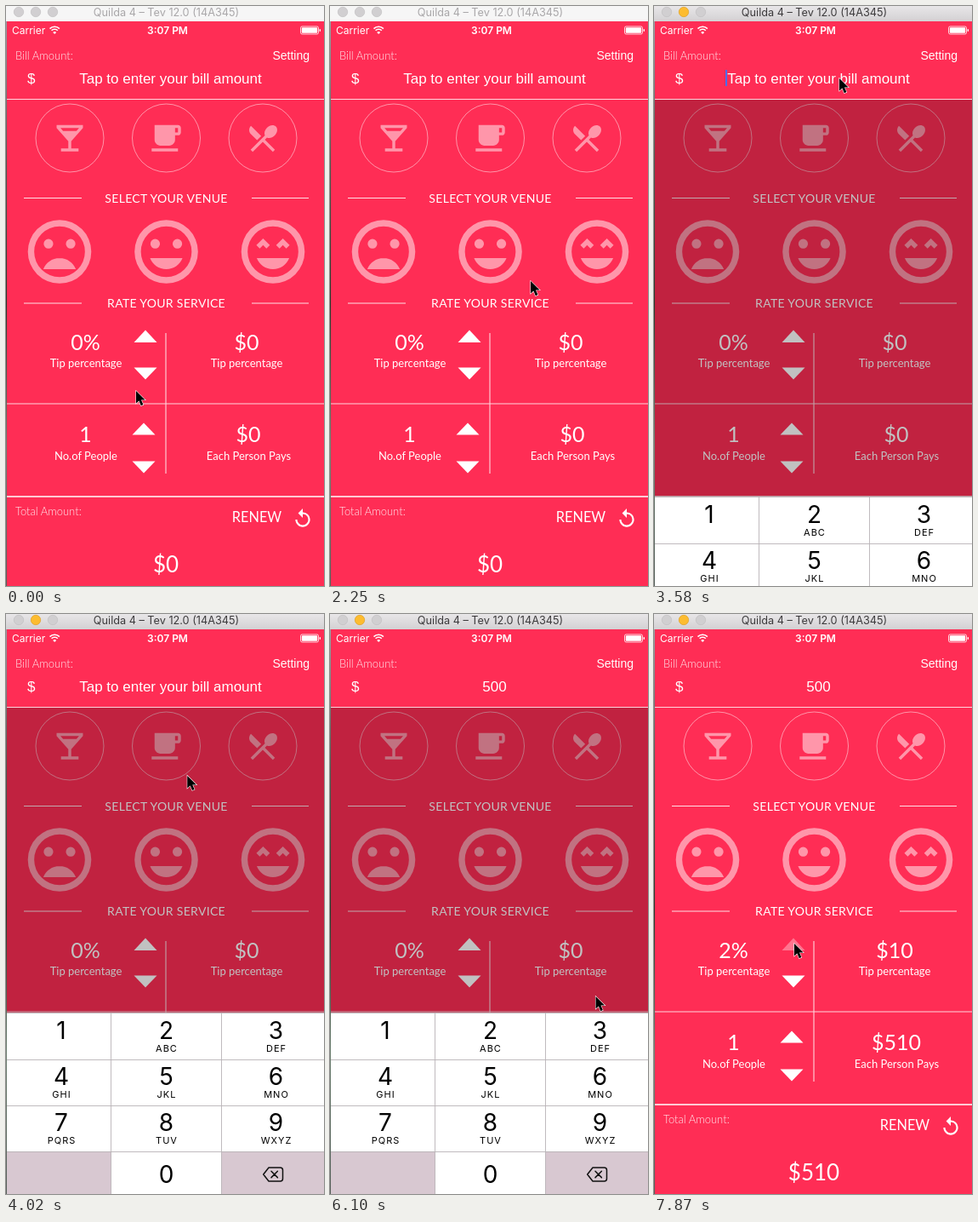
Write an HTML page that moves like this. It is 374x681 px and loops after 8 s.

```html
<!DOCTYPE html>
<html lang="en">
<head>
<meta charset="utf-8">
<title>Tip calculator</title>
<style>
html, body { margin: 0; width: 100%; height: 100%; overflow: hidden; background: #ff2d55; }
svg { display: block; width: 100%; height: 100%; }
text { fill: #fff; white-space: pre; }
.mid { text-anchor: middle; }
.ui { font-family: Inter, Roboto, sans-serif; }
.field { font-family: "Liberation Sans", Arial, sans-serif; }
.label { font-family: Lato, "Open Sans", sans-serif; font-size: 13px; }
.soft { font-weight: 300; }
.head { font-size: 14px; letter-spacing: .3px; }
.num { font-size: 25px; }
.total { font-size: 26px; }
.key { fill: #000; font-size: 28px; }
.abc { fill: #000; font-size: 11px; letter-spacing: 1px; }
.line { stroke: #fff; fill: none; }
.icon { fill: #fff; fill-opacity: .5; }
</style>
</head>
<body>
<svg id="stage" viewBox="0 0 374 681" preserveAspectRatio="none"></svg>
<script>
const text = (x, y, cls, s, more = '') => `<text x="${x}" y="${y}" class="${cls}" ${more}>${s}</text>`;
const path = (d, more = '') => `<path d="${d}" ${more}/>`;
const rect = (x, y, w, h, fill, more = '') =>
  `<rect x="${x}" y="${y}" width="${w}" height="${h}" fill="${fill}" ${more}/>`;
const glyph = (x, y, k, body, cls = 'icon') =>
  `<g class="${cls}" transform="translate(${x} ${y}) scale(${k}) translate(-12 -12)">${body}</g>`;

const GLASS = 'M21 5V3H3v2l8 9v5H6v2h12v-2h-5v-5l8-9zM7.43 7L5.66 5h12.69l-1.78 2H7.43z';
const CUP = 'M20 3H4v10c0 2.21 1.79 4 4 4h6c2.21 0 4-1.79 4-4v-3h2c1.11 0 2-.9 2-2V5c0-1.11-.89-2-2-2zm0 5h-2V5h2v3zM2 21h18v-2H2v2z';
const CUTLERY = 'M8.1 13.34l2.83-2.83L3.91 3.5c-1.56 1.56-1.56 4.09 0 5.66l4.19 4.18zm6.78-1.81c1.53.71 3.68.21 5.27-1.38 1.91-1.91 2.28-4.65.81-6.12-1.46-1.46-4.2-1.1-6.12.81-1.59 1.59-2.09 3.74-1.38 5.27L3.7 19.87l1.41 1.41L12 14.41l6.88 6.88 1.41-1.41L13.41 13l1.47-1.47z';
const REPLAY = 'M12 5V1L7 6l5 5V7c3.31 0 6 2.69 6 6s-2.69 6-6 6-6-2.69-6-6H4c0 4.42 3.58 8 8 8s8-3.58 8-8-3.58-8-8-8z';
const DOTS = 'M7 9.5a1.5 1.5 0 1 0 3 0a1.5 1.5 0 1 0-3 0zM14 9.5a1.5 1.5 0 1 0 3 0a1.5 1.5 0 1 0-3 0z';
const CARETS = 'M8.88 7.82L11 9.94 9.94 11 8.88 9.94 7.82 11 6.76 9.94zM13 9.94L14.06 11l1.06-1.06L16.18 11l1.06-1.06-2.12-2.12z';
const FROWN = 'M12 14c-2.33 0-4.32 1.45-5.12 3.5h10.24c-.8-2.05-2.79-3.5-5.12-3.5z';
const SMILE = 'M12 17.5c2.33 0 4.31-1.46 5.11-3.5H6.89c.8 2.04 2.78 3.5 5.11 3.5z';
const RING = 'M12 2a10 10 0 1 0 0 20a10 10 0 1 0 0-20zM12 4a8 8 0 1 1 0 16a8 8 0 1 1 0-16z';

const venue = (x, d) =>
  `<circle cx="${x}" cy="155" r="40" class="line" stroke-opacity=".55" stroke-width=".9"/>` +
  glyph(x, 155.3, 1.72, path(d));
const face = (x, eyes, mouth) => glyph(x, 288.5, 3.73, path(RING + eyes + mouth, 'fill-rule="evenodd"'));
const arrow = (x, y, h, id = '') => path(`M${x - 13.5} ${y}h27l-13.5 ${h}z`, `fill="#fff" ${id}`);
const heading = (y, s) =>
  path(`M21 ${y}H89M289 ${y}H356`, 'class="line" stroke-opacity=".85"') + text(188.5, y + 5, 'label mid head', s);

function windowBar() {
  return `<linearGradient id="bar" x2="0" y2="1"><stop stop-color="#e8e6e8"/><stop offset="1" stop-color="#d3d1d3"/></linearGradient>
    <linearGradient id="edge" x2="0" y2="1"><stop stop-color="#9a9fa2"/><stop offset=".25" stop-color="#4b5a50"/>
    <stop offset=".5" stop-color="#25382a"/><stop offset=".75" stop-color="#6f8273"/><stop offset="1" stop-color="#56605a"/></linearGradient>` +
    rect(0, 0, 374, 18, '#f6f6f6', 'id="top"') + rect(0, 18, 1, 663, 'url(#edge)') +
    [15, 35, 55].map((x, i) =>
      `<circle id="light${i}" cx="${x}" cy="7" r="5.7" fill="#d1cfd1" stroke="#c2c0c2" stroke-width=".7"/>`).join('') +
    text(188.5, 12, 'ui mid', 'Quilda 4 – Tev 12.0 (14A345)', 'id="title" font-size="12.7"');
}

function statusBar() {
  return text(7, 32.5, 'ui', 'Carrier', 'font-size="12"') +
    path('M51.5 26.6a8 8 0 0 1 11.4 0M53.6 28.8a5 5 0 0 1 7.2 0', 'class="line" stroke-width="1.6"') +
    path('M57.2 33l-2-2.1a2.8 2.8 0 0 1 4 0z', 'fill="#fff"') +
    text(190, 32.5, 'ui mid', '3:07 PM', 'font-size="12" font-weight="600"') +
    rect(346.5, 24, 21, 9, 'none', 'rx="1.8" stroke="#fff" stroke-width=".8"') +
    rect(347.8, 25.3, 18.4, 6.4, '#fff', 'rx=".8"') + rect(368.6, 27, 1.4, 3, '#fff', 'rx=".7"');
}

function appBody() {
  return text(11, 62.5, 'label soft', 'Bill Amount:', 'fill-opacity=".9"') +
    text(357, 63, 'field', 'Setting', 'font-size="14" text-anchor="end"') +
    text(25, 91, 'field', '$', 'font-size="17"') +
    text(193.5, 91, 'field mid', '', 'id="bill" font-size="17"') +
    rect(84, 75, 2, 19, '#4a6cf0', 'id="caret"') +
    path('M1 109.5H374', 'class="line" stroke-opacity=".8"') +
    venue(75, GLASS) + venue(188.5, CUP) + venue(302, CUTLERY) +
    heading(225.5, 'SELECT YOUR VENUE') +
    face(63, DOTS, FROWN) + face(188.5, DOTS, SMILE) + face(314, CARETS, SMILE) +
    heading(349, 'RATE YOUR SERVICE') +
    path('M188 384V549M1 467H374', 'class="line" stroke-opacity=".8" stroke-width="1.1"') +
    path('M1 576H374', 'class="line" stroke-width="1.6"') +
    text(93.5, 403.5, 'label mid num', '', 'id="rate"') + text(94, 424, 'label mid', 'Tip percentage') +
    text(283, 403.5, 'label mid num', '', 'id="tip"') + text(283, 424, 'label mid', 'Tip percentage') +
    text(93.5, 512, 'label mid num', '1') + text(94, 533, 'label mid', 'No.of People') +
    text(285, 512, 'label mid num', '', 'id="each"') + text(285.5, 533, 'label mid', 'Each Person Pays') +
    arrow(164, 395, -14.5, 'id="up"') + arrow(164, 424.5, 14) + arrow(162, 503.5, -14) + arrow(162, 534.5, 14) +
    text(11, 597.5, 'label soft', 'Total Amount:', 'fill-opacity=".9"') +
    text(295, 606, 'label mid', 'RENEW', 'style="font-size:16.3px"') +
    glyph(349, 602, 1.08, path(REPLAY), '" fill="#fff') +
    text(188, 665, 'label mid total', '', 'id="total"') +
    rect(1, 110, 373, 571, '#000', 'id="dim" fill-opacity=".245"');
}

// Drawn with its top edge at y = 0.
function keypad() {
  const letters = ['', 'ABC', 'DEF', 'GHI', 'JKL', 'MNO', 'PQRS', 'TUV', 'WXYZ'];
  const cx = [65, 188.5, 317.5];
  const keys = letters.map((s, i) => {
    const x = cx[i % 3], y = 54 * Math.floor(i / 3);
    return text(x, y + 31, 'ui mid key', i + 1) + text(x + .5, y + 46, 'ui mid abc', s);
  }).join('');
  return rect(1, 0, 373, 216, '#fff') + rect(1, 163, 122.5, 53, '#d8c8d1') + rect(253.5, 163, 121, 53, '#d8c8d1') +
    rect(124, 55.5, 129.5, 54, '#d8c8d1', 'id="key5"') + rect(124, 163.5, 129.5, 54, '#d8c8d1', 'id="key0"') +
    path('M1 .5H374M1 55.5H374M1 109.5H374M1 163.5H374M123.5 0V216M253.5 0V216', 'stroke="#b9b4b7" fill="none" stroke-width=".9"') +
    keys + text(188.5, 200, 'ui mid key', '0') +
    path('M309 182H322.5a3 3 0 0 1 3 3v10a3 3 0 0 1-3 3H309l-6.3-8zM312 186.2l7.4 7.4M319.4 186.2l-7.4 7.4',
      'fill="none" stroke="#111" stroke-width="1.5" stroke-linejoin="round" stroke-linecap="round"');
}

const stage = document.getElementById('stage');
stage.innerHTML = rect(0, 0, 374, 681, '#ff2d55') + windowBar() + statusBar() + appBody() +
  `<g id="pad">${keypad()}</g>` +
  path('M0 0V14.6L3.4 11.5 5.8 17.2 8.4 16.1 6 10.5H10.6Z', 'id="mouse" stroke="#fff" stroke-width="1.1" paint-order="stroke"');
const el = {};
stage.querySelectorAll('[id]').forEach(n => el[n.id] = n);

const LOOP = 8000;
// Screen updates come in bursts: first time, last time, number of updates.
const BURSTS = [[150, 600, 4], [2250, 3290, 8], [3440, 4470, 8], [4620, 5200, 5], [5500, 6100, 5], [6540, 6540, 1], [6990, 7870, 7]];
// Pointer way points: time, x, y.
const WAY = [
  [0, 153, 452], [150, 153, 450], [450, 174, 483],
  [2250, 236, 323], [2550, 308, 490], [2700, 323, 527], [3000, 262, 220], [3290, 218, 85],
  [3900, 218, 85], [4470, 197, 550], [4620, 198, 555], [4770, 203, 609], [5050, 198, 657], [5200, 197, 660],
  [5650, 197, 660], [6090, 312.5, 449], [6840, 312.5, 449], [7280, 172, 392], [7430, 165, 387], [LOOP, 165, 387]
];
const TYPED = [[4600, '5'], [5500, '50'], [5640, '500']];

const between = (t, a, b) => t >= a && t < b;
const smooth = p => { p = Math.min(1, Math.max(0, p)); return p * p * (3 - 2 * p); };
const show = (node, on) => node.setAttribute('visibility', on ? 'visible' : 'hidden');

function snap(t) {
  let q = 0;
  for (const [a, b, n] of BURSTS) {
    if (t < a) break;
    const d = (b - a) / (n - 1) || 1;
    q = a + Math.min(n - 1, Math.floor((t - a) / d + .1)) * d;
  }
  return q;
}

function pointer(t) {
  const i = Math.max(1, WAY.findIndex(p => p[0] > t));
  const [a, x, y] = WAY[i - 1], [b, u, v] = WAY[i];
  const p = (t - a) / (b - a);
  return [x + (u - x) * p, y + (v - y) * p];
}

function draw(time) {
  const t = snap(time);
  const active = t >= 3435, editing = between(t, 3500, 6500);

  el.top.setAttribute('fill', active ? 'url(#bar)' : '#f6f6f6');
  el.title.style.fill = active ? '#3c3a3c' : '#a9a7a9';
  el.light1.setAttribute('fill', active ? '#fdbc30' : '#d1cfd1');
  el.light1.setAttribute('stroke', active ? '#dfa023' : '#c2c0c2');

  const last = TYPED.filter(k => t >= k[0]).pop();
  const bill = last ? last[1] : '';
  el.bill.textContent = bill || 'Tap to enter your bill amount';
  const since = t - (last ? last[0] : 3500);
  show(el.caret, editing && since % 1000 < 440);
  el.caret.setAttribute('x', bill ? 193.5 + bill.length * 4.73 : 84);

  const rate = t >= 7850 ? 2 : t >= 7570 ? 1 : 0;
  const tip = bill * rate / 100, sum = +bill + tip;
  el.rate.textContent = rate + '%';
  el.tip.textContent = '$' + tip;
  el.each.textContent = el.total.textContent = '$' + sum;
  el.up.setAttribute('fill-opacity', between(t, 7420, 7700) || t >= 7850 ? .35 : 1);

  show(el.dim, editing);
  el.pad.style.display = editing ? '' : 'none';
  el.pad.setAttribute('transform', `translate(0 ${Math.round(681 - 213 * smooth((t - 3440) / 298))})`);
  show(el.key5, editing && between(t, 4460, 4610));
  show(el.key0, editing && between(t, 5490, 5780));

  show(el.mouse, !between(t, 595, 2250));
  el.mouse.setAttribute('transform', `translate(${pointer(t)})`);
}

const start = performance.now();
function tick() {
  draw((performance.now() - start) % LOOP);
  requestAnimationFrame(tick);
}
draw(0);
tick();
</script>
</body>
</html>
```
